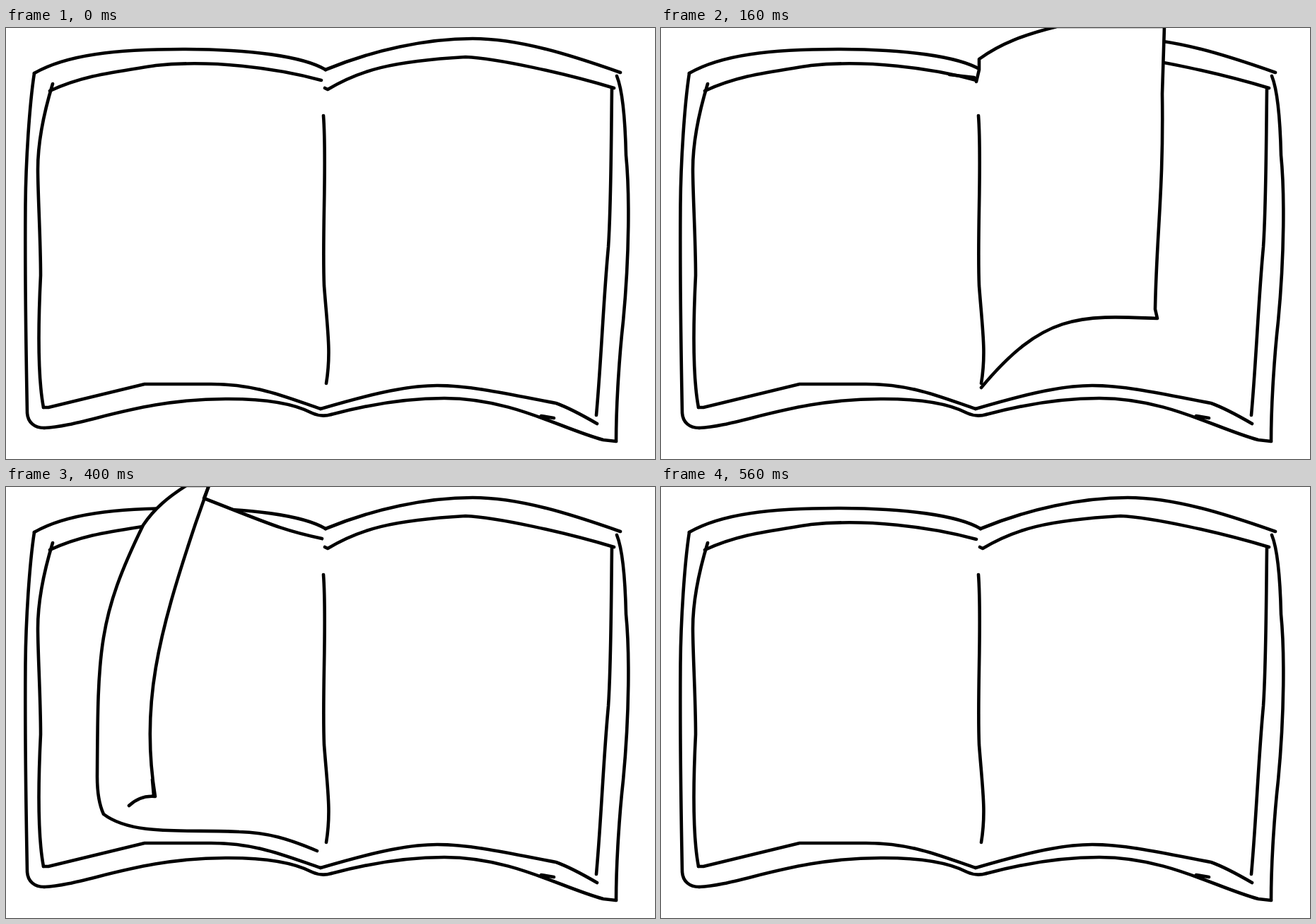
An HTML page that plays this animation: 918x610 px, repeating every 640 ms.

```html
<!DOCTYPE html>
<html lang="en">
<head>
<meta charset="utf-8">
<title>Turning page</title>
<style>
  html, body { margin: 0; width: 100%; height: 100%; overflow: hidden; background: #fff; }
  svg { display: block; width: 100vw; height: 100vh; }
  path { fill: none; stroke: #000; stroke-width: 4.6; stroke-linecap: round; stroke-linejoin: round; }
  .page { fill: #fff; }
</style>
</head>
<body>
<svg id="stage" viewBox="0 0 918 610"></svg>
<script>
const STEP = 80;
const stage = document.getElementById('stage');

const book = {
  topLeft: 'M452,59 C420,40 345,30 250,30 S85,38 40,64',
  leftCover: 'M40,64 C33,110 28,190 27.5,250 S28,440 30,545 C31,558 40,566 54,566',
  bottomLeft: 'M54,566 C110,564 190,524 315,525 C375,525 412,534 433,545 Q446,551 460,547',
  bottomRight: 'M460,547 C505,535 560,524 620,524 C715,524 785,567 845,583 L863,585 M757,549 L775,552',
  rightCover: 'M863,585 C863,530 868,460 873,415 C882,320 882,230 877,180 Q875,95 864,68',
  topRight: 'M452,59 C520,31 595,15 660,15 S795,37 869,63',
  innerTopLeft: 'M62,89 C110,67 150,63 212,53 C290,45 380,56 446,74',
  innerLeft: 'M66,79 C52,125 45,165 45,200 S49,300 49,350 C45,430 46,500 53,537',
  innerBottomLeft: 'M53,537 H60 L196,504 H290 C355,504 395,522 445,539',
  innerBottomRight: 'M445,539 C500,523 560,506 610,506 S720,520 778,531 Q800,539 836,560',
  innerTopRight: 'M451,85 L455,87 C500,60 545,47 650,41 C695,43 790,64 860,85',
  innerRight: 'M857,85 C856,160 856,250 852,310 C845,385 842,470 835,548',
  spine: 'M449,124 C454,190 447,290 450,365 C455,430 460,460 453,503'
};

// A page is filled white and hides the book lines behind it.
const rest = {};
const poses = [
  rest,
  {
    hide: ['innerTopRight', 'innerRight', 'innerBottomRight'],
    page: 'M446,68 C452,45 500,5 650,-4 C720,-4 760,16 833,33 L823,43 C830,170 837,300 830,494 C690,470 545,485 456,539',
    extra: 'M835,84 L857,92 C869,170 851,250 851,350 V500 L842,545 M478,536 C550,515 630,515 715,518 Q780,534 840,553'
  },
  {
    page: 'M446,76 L450,59 V44 C480,22 515,9 560,-2 H712 L709,93 C711,230 701,290 699,398 L702,411 C590,406 540,405 453,509',
    extra: 'M408,66 L443,70'
  },
  {
    page: 'M440,56 C480,20 520,7 570,-3 H632 C600,120 575,290 604,412 C530,412 490,440 448,531'
  },
  {
    hide: ['spine'],
    page: 'M428,528 C390,505 365,480 339,433 C332,290 335,250 355,100 C357,80 400,30 535,0 ' +
      'L541,8 534,32 C510,120 472,230 472,320 C472,360 482,400 505,433 C430,492 418,515 446,534'
  },
  {
    page: 'M447,73 C390,61 370,51 280,16 L287,-2 H255 C230,14 210,30 194,54 ' +
      'C130,185 130,230 129,410 C129,435 132,450 138,463 C180,495 260,484 330,488 C370,489 400,498 440,515',
    extra: 'M287,-2 L268,52 C215,210 190,310 211,438 Q190,436 174,451 M207,414 L209,437'
  },
  {
    page: 'M446,72 C390,50 300,23 215,23 C175,23 140,30 118,39 C95,110 80,200 80,300 S84,450 89,504 C200,478 330,475 442,526'
  },
  rest
];

function add(parent, tag, attrs) {
  const node = document.createElementNS('http://www.w3.org/2000/svg', tag);
  for (const name in attrs) node.setAttribute(name, attrs[name]);
  return parent.appendChild(node);
}

const groups = poses.map(({ hide = [], page, extra }) => {
  const group = add(stage, 'g', { display: 'none' });
  const { spine, ...frame } = book;
  for (const name in frame) if (!hide.includes(name)) add(group, 'path', { d: frame[name] });
  if (page) add(group, 'path', { class: 'page', d: page });
  if (!hide.includes('spine')) add(group, 'path', { d: spine });
  if (extra) add(group, 'path', { d: extra });
  return group;
});

const start = performance.now();
function render() {
  const current = Math.floor((performance.now() - start) / STEP) % groups.length;
  groups.forEach((group, i) => group.setAttribute('display', i === current ? 'inline' : 'none'));
  requestAnimationFrame(render);
}
render();
</script>
</body>
</html>
```
